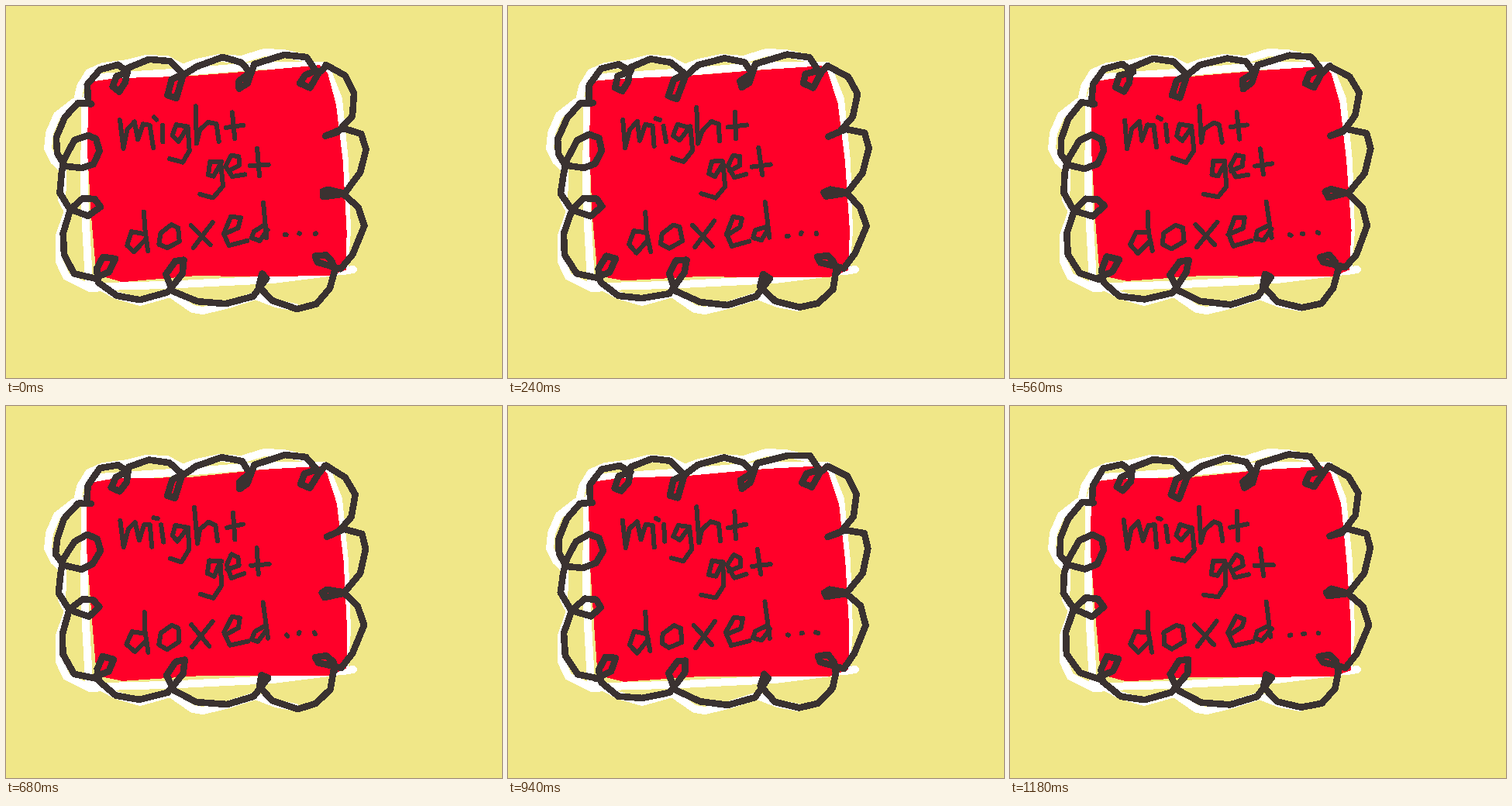
Recreate the animation shown at these times as an HTML page. Size 640 px wide and 480 px high, loop 1200 ms.

```html
<!DOCTYPE html>
<html lang="en">
<meta charset="utf-8">
<title>might get doxed...</title>
<style>
  html, body { margin: 0; width: 100%; height: 100%; overflow: hidden; background: #f0e788; }
  svg { display: block; width: 640px; height: 480px; fill: none; stroke-linejoin: round; shape-rendering: crispEdges; }
</style>
<svg id="stage" viewBox="0 0 640 480" role="img" aria-label="might get doxed..."></svg>
<script>
const stage = document.getElementById('stage');
const INK = '#3a3231';
const LOOP = 1200, TICK = 20;

const halo = [
  'M107 122L92 122L96 104L107 86L125 78L157 74L181 68L208 69L228 80L246 73L275 67L304 69L333 60L358 61L385 67',
  'M106 125L88 124L66 141L56 164L54 184L62 200L73 210L73 228L72 250L80 265L69 296L69 330L78 349L108 364L130 363',
  'M118 360L142 373L173 382L212 371L241 391L254 393L284 386L322 374L348 384L374 389',
  'M127 362L107 356L101 245L102 130L107 106L120 92L230 85L330 77L412 77L429 120L437 200L440 290L436 342L448 340L345 353L205 360Z',
];

const card = 'M105 106L110 98L140 93L235 91L330 82L404 77L414 86L426 126L435 200L440 290L439 340L416 349' +
  'L330 349L245 349L150 355L116 347L110 270L105 190Z';

const frame = {
  left: 'M109 126L92 125L76 145L65 171L65 191L75 206L97 210L113 203L122 186L117 171L105 166L88 174L75 198L71 215' +
    'L69 242L82 263L106 272L121 259L114 250L98 248L82 263L73 293L74 321L89 345L117 352',
  bottom: 'M113 351L132 343L140 326L126 323L117 340L120 356L142 374L173 378L209 370L228 345L230 328L218 329L207 346' +
    'L216 367L247 382L284 385L319 375L337 351L330 346L326 362L344 381L376 390L401 384L418 365L424 342',
  right: 'M424 342L421 330L413 322L399 323L403 331L432 338L447 320L462 284L455 259L436 242L410 246L408 240L415 236' +
    'L437 241L457 216L465 184L459 165L435 159L413 168L429 163L446 142L450 113L438 91L412 77',
  top: 'M412 78L403 87L393 105L380 100L385 88L401 83L388 65L360 63L320 75L312 99L302 106L300 97L315 86L305 72L279 67' +
    'L246 77L228 90L219 119L208 115L214 95L228 88L211 72L185 69L158 79L155 98L147 110L137 105L142 91L158 84L144 76L121 81L106 102L105 126',
};

const letters = [
  'M147 147L151 183L157 159L166 149L171 173L178 153L186 154L189 182',
  'M191 144L195 146M201 154L203 175',
  'M234 156L219 153L214 168L222 174L235 156L237 186L227 201L211 197',
  'M244 130L246 177L250 160L262 150L271 153L274 175',
  'M293 137L295 172M284 157L307 153',
  'M277 201L263 200L260 217L268 220L277 202L279 232L268 247L250 243',
  'M286 212L300 206L300 195L291 192L284 206L291 221L308 217',
  'M323 184L327 218M315 207L339 204',
  'M178 266L179 290L183 317M178 293L163 291L156 308L166 318L180 302',
  'M214 283L199 293L198 307L208 313L224 304L222 286Z',
  'M239 283L263 309M267 278L241 311',
  'M282 295L300 286L302 274L291 272L281 293L288 309L312 303',
  'M331 253L337 299M333 284L320 290L316 300L326 303L337 288',
  'M361 296L362 296M378 293L379 293M398 293L399 293',
];

const add = (d, color, width) => {
  const path = document.createElementNS('http://www.w3.org/2000/svg', 'path');
  path.setAttribute('d', d);
  if (width) {
    path.setAttribute('stroke', color);
    path.setAttribute('stroke-width', width);
    path.setAttribute('stroke-linecap', 'round');
  } else path.setAttribute('fill', color);
  stage.append(path);
  return path;
};

const noise = (a, b) => {
  const n = Math.sin(a * 12.9898 + b * 78.233) * 43758.5453;
  return (n - Math.floor(n)) * 2 - 1;
};

// Shift every coordinate a little; the same pose always gives the same shape.
const wobble = (d, pose, amount) => {
  let i = 0;
  return d.replace(/\d+/g, n => (+n + amount * noise(++i, pose)).toFixed(1));
};

halo.forEach(d => add(d, '#fff', 10));
const parts = [
  { d: card, path: add(card, '#ff0029'), amount: 1.2 },
  ...Object.values(frame).map(d => ({ d, path: add(d, INK, 8.6), amount: 1.3, slow: true })),
  ...letters.map(d => ({ d, path: add(d, INK, 6), amount: 1.2 })),
];
const framePoses = [0, 0, 1, 2, 3, 5, 4, 4, 5, 6];

function draw(now) {
  const t = now % LOOP;
  const tick = Math.max(1, Math.floor(t / TICK));
  const framePose = framePoses[Math.floor(t / 120)];
  parts.forEach(({ d, path, amount, slow }, i) => {
    const pose = slow ? framePose : Math.floor((tick + i) / 3);
    path.setAttribute('d', wobble(d, pose + i * 31, amount));
  });
  requestAnimationFrame(draw);
}
draw(0);
</script>
</html>
```
